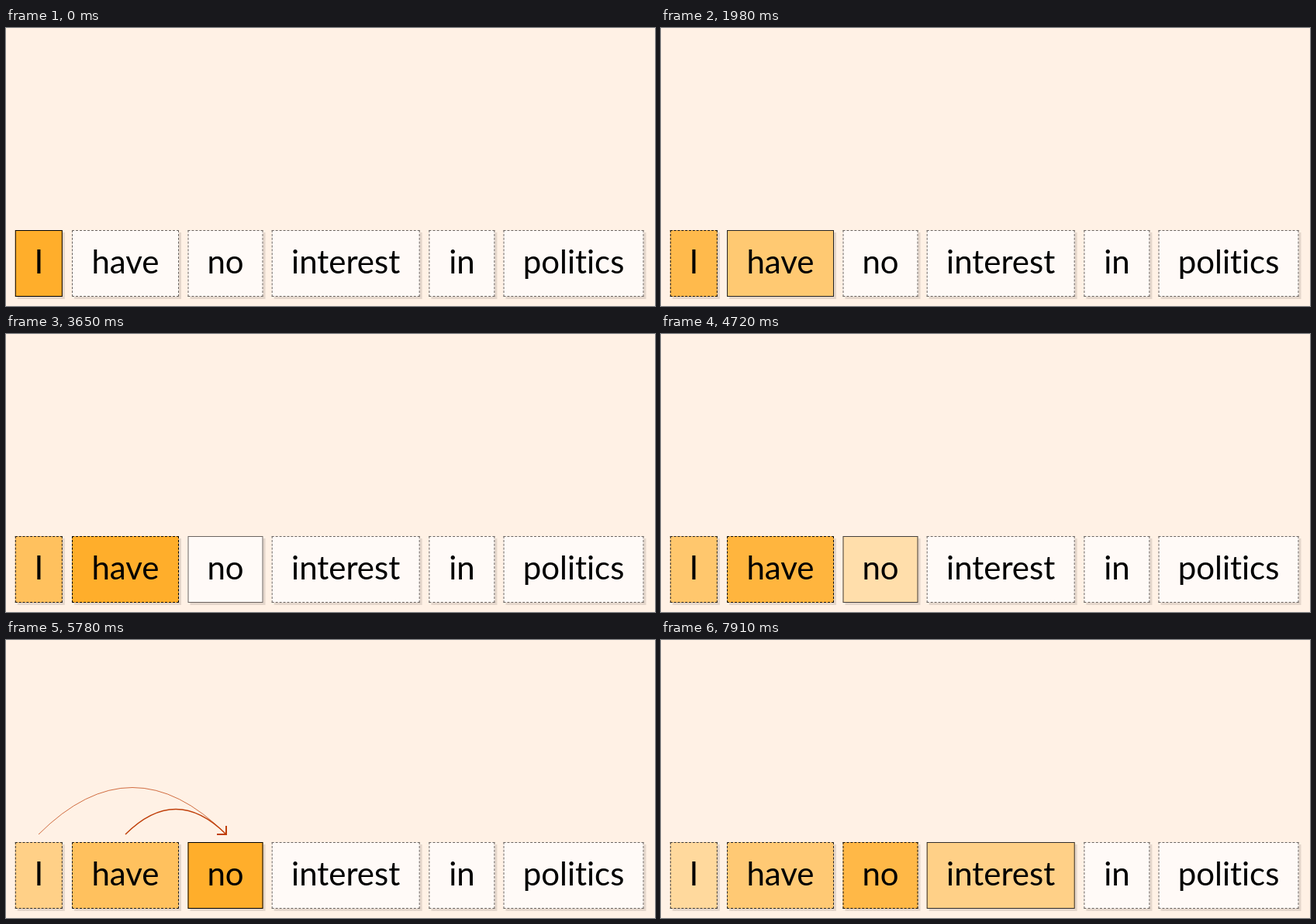
Recreate the animation shown at these times as an HTML page. Size 837 by 359 pixels, loop 8000 ms.

```html
<!DOCTYPE html>
<html lang="en">
<head>
<meta charset="utf-8">
<title>Reading a sentence word by word</title>
<style>
/* Progress of each reading step, 0 to 1 */
@property --p2 { syntax: "<number>"; inherits: true; initial-value: 0; }
@property --p3 { syntax: "<number>"; inherits: true; initial-value: 0; }
@property --p4 { syntax: "<number>"; inherits: true; initial-value: 0; }

html, body { margin: 0; width: 100%; height: 100%; overflow: hidden; background: #fff1e5; }

.stage {
  position: relative;
  width: 837px;
  height: 359px;
  overflow: hidden;
  animation: step2 8s step-end infinite, step3 8s step-end infinite, step4 8s step-end infinite;
}

/* Placed by transform, so that edges may fall between pixels */
.word {
  --heat: 0;
  --dark: calc(1 - var(--heat));
  position: absolute;
  left: 0;
  top: 261px;
  width: var(--w);
  height: 86px;
  transform: translateX(var(--x));
  box-sizing: border-box;
  border: 1px dashed rgb(calc(106 * var(--dark)) calc(100 * var(--dark)) calc(96 * var(--dark)));
  background: rgb(255 calc(250 - 76 * var(--heat)) calc(247 - 204 * var(--heat)));
  box-shadow: 3px 3px 0 #e4d6cb;
  font: 42px/78px Lato, "Open Sans", sans-serif;
  font-variant-ligatures: none;
  color: #000;
  text-align: center;
  white-space: nowrap;
}

.w1 {
  --heat: calc(1 - .25 * var(--p2) - .2 * var(--p3) - .2 * var(--p4));
  --x: 11.8px; --w: 61px;
  animation: active1 8s step-end infinite;
}
.w2 {
  --heat: calc(var(--p2) - .25 * var(--p3) - .2 * var(--p4));
  --x: 85px; --w: 138px;
  animation: active2 8s step-end infinite;
}
.w3 {
  --heat: calc(var(--p3) - .25 * var(--p4));
  --x: 234.5px; --w: 97px;
  animation: active3 8s step-end infinite;
}
.w4 {
  --heat: var(--p4);
  --x: 342.7px; --w: 191px;
  animation: active4 8s step-end infinite;
}
.w5 { --x: 545.4px; --w: 85px; }
.w6 { --x: 641.5px; --w: 181px; }

svg { position: absolute; inset: 0; fill: none; stroke: #c0400b; }
.strong { stroke-width: 1.5; }
.weak { stroke-width: 1; stroke-opacity: .75; }
.head { stroke-width: 2; }
.to2, .to3 { opacity: 0; }
.to2 { animation: link2 8s step-end infinite; }
.to3 { animation: link3 8s step-end infinite; }

@keyframes step2 {
  0% { --p2: 0; }
  17.375% { --p2: .22; }
  21.125% { --p2: .42; }
  21.5% { --p2: .45; }
  21.875% { --p2: .48; }
  22.25% { --p2: .51; }
  24.75% { --p2: .65; }
  27.25% { --p2: .76; }
  27.625% { --p2: .8; }
  30.5% { --p2: .93; }
  32.125%, 100% { --p2: 1; }
}
@keyframes step3 {
  0% { --p3: 0; }
  54% { --p3: .125; }
  56.5% { --p3: .25; }
  59% { --p3: .375; }
  61.5% { --p3: .5; }
  64% { --p3: .625; }
  66.5% { --p3: .75; }
  69% { --p3: .875; }
  71.5%, 100% { --p3: 1; }
}
@keyframes step4 {
  0% { --p4: 0; }
  87.25% { --p4: .09; }
  88.875% { --p4: .15; }
  91.375% { --p4: .25; }
  92.625% { --p4: .3; }
  95.125% { --p4: .4; }
  97.625% { --p4: .5; }
  98.875%, 100% { --p4: .55; }
}

@keyframes active1 {
  0% { border-style: solid; }
  11.375%, 100% { border-style: dashed; }
}
@keyframes active2 {
  0% { border-style: dashed; }
  11.375% { border-style: solid; }
  45.625%, 100% { border-style: dashed; }
}
@keyframes active3 {
  0% { border-style: dashed; }
  45.625% { border-style: solid; }
  84.625%, 100% { border-style: dashed; }
}
@keyframes active4 {
  0% { border-style: dashed; }
  84.625%, 100% { border-style: solid; }
}

@keyframes link2 {
  0% { opacity: 0; }
  30.5% { opacity: .5; }
  32.125% { opacity: 1; }
  45.625%, 100% { opacity: 0; }
}
@keyframes link3 {
  0% { opacity: 0; }
  71.5% { opacity: .5; }
  72.25% { opacity: 1; }
  84.625%, 100% { opacity: 0; }
}
</style>
</head>
<body>
<div class="stage">
  <svg width="837" height="359" viewBox="0 0 837 359">
    <g class="to2">
      <path class="strong" d="M42 251Q98 195 154 251"/>
      <path class="head" d="M142 251H154V240"/>
    </g>
    <g class="to3">
      <path class="weak" d="M42 251Q163 130 284 251"/>
      <path class="strong" d="M154 251Q219 186 284 251"/>
      <path class="head" d="M272 251H284V240"/>
    </g>
  </svg>
  <div class="word w1">I</div>
  <div class="word w2">have</div>
  <div class="word w3">no</div>
  <div class="word w4">interest</div>
  <div class="word w5">in</div>
  <div class="word w6">politics</div>
</div>
</body>
</html>
```
